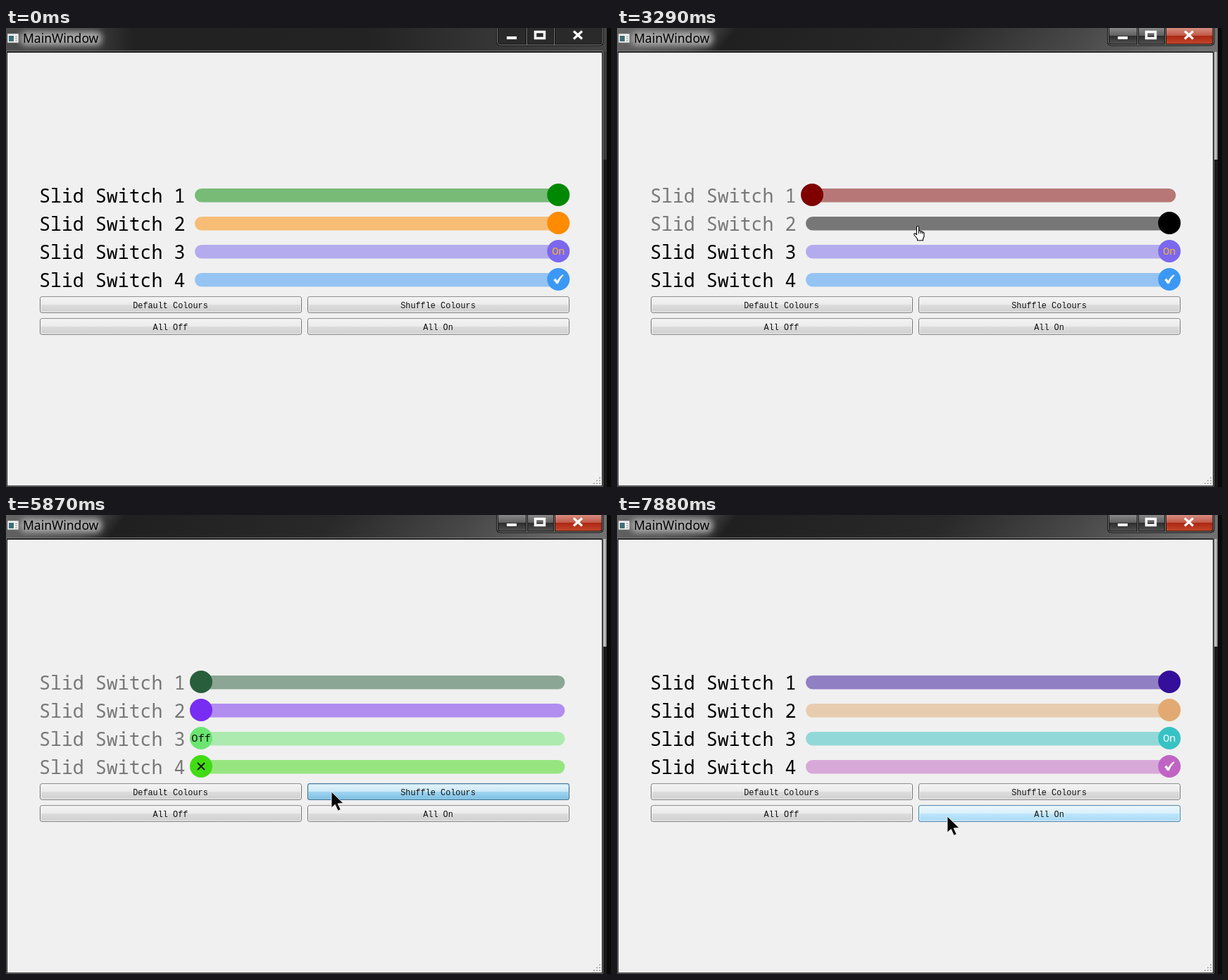
Write an HTML page that moves like this. It is 859 by 652 pixels and loops after 8000 ms.

```html
<!DOCTYPE html>
<html lang="en">
<head>
<meta charset="utf-8">
<title>Slide switches</title>
<style>
html, body { margin: 0; width: 100%; height: 100%; overflow: hidden; background: #000; }
svg { display: block; width: 859px; height: 652px; }
.label { font: 26.6px "Noto Sans Mono", monospace; }
.mark { font: 500 15.2px "Noto Sans Mono", monospace; text-anchor: middle; }
.btn { font: 11.85px "Liberation Mono", monospace; text-anchor: middle; fill: #111; }
.title { font: 17.5px "Noto Sans", sans-serif; }
</style>
</head>
<body>
<svg id="stage" viewBox="0 0 859 652" xmlns="http://www.w3.org/2000/svg">
  <defs>
    <linearGradient id="glass">
      <stop offset="0" stop-color="#4c4c4c"/><stop offset=".15" stop-color="#3a3a3a"/>
      <stop offset=".21" stop-color="#222"/><stop offset=".6" stop-color="#232323"/>
      <stop offset=".78" stop-color="#333"/><stop offset="1" stop-color="#444"/>
    </linearGradient>
    <linearGradient id="glassOn" x2="1" y2=".03">
      <stop offset="0" stop-color="#666"/><stop offset=".15" stop-color="#484848"/>
      <stop offset=".2" stop-color="#202020"/><stop offset=".55" stop-color="#292929"/>
      <stop offset=".78" stop-color="#484848"/><stop offset="1" stop-color="#707070"/>
    </linearGradient>
    <linearGradient id="red" x2="0" y2="1">
      <stop offset="0" stop-color="#d58d80"/><stop offset=".45" stop-color="#c25a48"/>
      <stop offset=".46" stop-color="#ac2612"/><stop offset="1" stop-color="#c64a2e"/>
    </linearGradient>
    <linearGradient id="grey" x2="0" y2="1">
      <stop offset="0" stop-color="#888"/><stop offset=".45" stop-color="#606060"/>
      <stop offset=".46" stop-color="#2c2c2c"/><stop offset="1" stop-color="#555"/>
    </linearGradient>
    <filter id="blur" x="-20%" y="-60%" width="140%" height="220%"><feGaussianBlur stdDeviation="4"/></filter>
  </defs>

  <rect width="859" height="652" fill="#0a0a0a"/>
  <rect width="853" height="652" fill="#191919"/>
  <rect width="853" height="187" fill="#3a3a3a"/>
  <rect width="853" height="34" fill="url(#glass)"/>
  <g id="active">
    <rect width="853" height="187" fill="#777"/>
    <rect x="848.5" y="34" width="3" height="153" fill="#c4c4c4"/>
    <rect width="853" height="34" fill="url(#glassOn)"/>
  </g>
  <rect x="20" y="5" width="116" height="20" rx="8" fill="#a8a8a8" filter="url(#blur)"/>
  <rect x="2" y="8" width="16" height="13" fill="#f4f4f4" stroke="#777" stroke-width=".8"/>
  <rect x="4" y="11" width="7" height="8" fill="#3d6f78"/>
  <path d="M13 12h3M13 15h3M13 18h3" stroke="#888"/>
  <text class="title" x="24" y="21">MainWindow</text>

  <g id="caption"></g>
  <rect x=".5" y="32.5" width="847" height="619" fill="none" stroke="#777" rx="1"/>
  <rect x="1" y="33.5" width="846" height="617.5" fill="#111"/>
  <rect x="2" y="35" width="844" height="615" fill="#f0f0f0"/>
  <path id="grip" fill="#b4b4b4"/>

  <g id="switches"></g>
  <g id="buttons"></g>
  <g id="cursor">
    <path id="arrow" d="M0 0V23L5.3 18.3L9.3 27.2L13.2 25.4L9.2 16.9L17 16.6Z" fill="#080808" stroke="#fff" stroke-width=".8"/>
    <g id="hand" stroke="#000" stroke-width="1.1" stroke-linejoin="round">
      <path fill="#fff" d="M.5 0Q.5-1.5 2-1.5Q3.5-1.5 3.5 0V5Q6 4.4 6.3 6Q8.5 5.4 8.8 7Q11 6.8 11 8.5V13L9.5 16.5V18.8H1.5V16.5L-3 11Q-3.6 8.8-1.8 8.8L.5 10.5Z"/>
      <path fill="none" d="M3.5 5V9M6.3 6V9M8.8 7V9.5"/>
    </g>
    <circle id="press" r="13" fill="#f0f01e" opacity=".58"/>
  </g>
</svg>
<script>
const $ = id => document.getElementById(id);
const NS = "http://www.w3.org/2000/svg";
const LOOP = 8000;

function add(parent, tag, attrs, text) {
  const el = document.createElementNS(NS, tag);
  for (const k in attrs) el.setAttribute(k, attrs[k]);
  if (text) el.textContent = text;
  parent.appendChild(el);
  return el;
}
const set = (el, attrs) => { for (const k in attrs) el.setAttribute(k, attrs[k]); };
const show = (el, on) => el.setAttribute("visibility", on ? "visible" : "hidden");
const within = (t, a, b) => t >= a && t < b;

// Linear interpolation over [time, value] pairs
function track(t, keys) {
  if (t <= keys[0][0]) return keys[0][1];
  for (let i = 1; i < keys.length; i++) {
    const [t0, v0] = keys[i - 1], [t1, v1] = keys[i];
    if (t < t1) return v0 + (v1 - v0) * (t - t0) / (t1 - t0);
  }
  return keys[keys.length - 1][1];
}

// Window caption buttons
const caption = $("caption");
const frame = "M697.5 -2V19Q697.5 24 702.5 24H842Q847 24 847 19V-2";
add(caption, "path", { d: frame, fill: "#2a2a2a" });
const lit = add(caption, "g", {});
add(lit, "path", { d: "M698 0V19Q698 24 703 24H778V0Z", fill: "url(#grey)" });
add(lit, "path", { d: "M778 0V24H842Q847 24 847 19V0Z", fill: "url(#red)" });
add(caption, "path", { d: frame + "M739.5 0V24M778.5 0V24", fill: "none", stroke: "#101010", "stroke-width": 3 });
add(caption, "path", { d: frame + "M739.5 0V24M778.5 0V24", fill: "none", stroke: "#858585" });
const glyph = { fill: "none", stroke: "#fff" };
add(caption, "rect", { x: 710.5, y: 11.5, width: 15, height: 5, fill: "#fff", stroke: "#333" });
add(caption, "rect", { x: 751.5, y: 5.5, width: 13, height: 9, ...glyph, "stroke-width": 3.5 });
add(caption, "path", { d: "M806 4.5L818 15.5M818 4.5L806 15.5", ...glyph, "stroke-width": 3.2 });

let dots = "";
for (let r = 0; r < 3; r++)
  for (let c = 0; c <= r; c++) dots += `M${842 - 4 * c} ${638 + 4 * r}h2v2h-2z`;
$("grip").setAttribute("d", dots);

// Switches
const COLORS = {
  on: ["#008800", "#ff8c00", "#7b68ee", "#3c98f5"],
  off: ["#800000", "#000", "#c8c8c8", "#c8c8c8"],
  shuffledOff: ["#285e3c", "#772df2", "#6be571", "#41dc14"],
  shuffledOn: ["#34109a", "#e2aa72", "#38c2c4", "#c064c4"]
};
const SHUFFLE = 5700, ALL_ON = 7650;
const OFF_AT = [2510, 3290, 4000, 4620];
const LEFT = 277, RIGHT = 784.3;

const switches = OFF_AT.map((_, i) => {
  const g = add($("switches"), "g", { transform: `translate(0 ${237 + 40 * i})` });
  const label = add(g, "text", { class: "label", x: 47, y: 10.5 }, `Slid Switch ${i + 1}`);
  const bar = add(g, "rect", { x: 268, y: -9, width: 525.5, height: 19.5, rx: 9.75, opacity: .5 });
  const knob = add(g, "g", {});
  const disc = add(knob, "circle", { r: 16 });
  let on, off;
  if (i === 2) {
    on = add(knob, "text", { class: "mark", y: 5 }, "On");
    off = add(knob, "text", { class: "mark", y: 5 }, "Off");
  } else if (i === 3) {
    on = add(knob, "path", { d: "M-7 1L-4 -1.5L-1.8 2Q1.5 -4 6.2 -6.8L7.4 -5.8Q2.5 -1 -.5 6.2H-3Q-4.5 3 -7 1Z" });
    off = add(knob, "path", { d: "M-5 -5L5 5M5 -5L-5 5", fill: "none", "stroke-width": 1.8 });
  }
  return { label, bar, knob, disc, on, off };
});

function drawSwitch(s, i, t) {
  const again = t >= ALL_ON, on = t < OFF_AT[i] || again;
  const shuffled = t >= SHUFFLE;
  const color = COLORS[on ? (again ? "shuffledOn" : "on") : (shuffled ? "shuffledOff" : "off")][i];
  const since = t < OFF_AT[i] ? 1e4 : t - (again ? ALL_ON : OFF_AT[i]);
  const p = Math.min(1, Math.floor(since / 70) * 75 / 120);
  const x = on ? LEFT + (RIGHT - LEFT) * p : RIGHT + (LEFT - RIGHT) * p;
  set(s.label, { fill: on ? "#000" : "#787878" });
  set(s.bar, { fill: color });
  set(s.disc, { fill: color });
  set(s.knob, { transform: `translate(${x} 0)` });
  if (!s.on) return;
  const ink = on ? (i === 2 && !again ? "#ffb62a" : "#fff") : (shuffled ? "#111" : "#fff");
  show(s.on, on);
  show(s.off, !on);
  set(s.on, { fill: ink });
  set(s.off, i === 2 ? { fill: ink } : { stroke: ink });
}

// Push buttons: normal, hover and pressed skins stacked
const SKINS = [
  ["#f3f3f3", "#ebebeb", "#dddddd", "#cfcfcf", "#707070"],
  ["#eaf6fd", "#d9f0fc", "#bee6fd", "#a7d9f5", "#3c7fb1"],
  ["#e5f4fc", "#c4e5f6", "#98d1ef", "#68b3db", "#2c628b"]
];
SKINS.forEach((c, n) => {
  const grad = add(document.querySelector("defs"), "linearGradient", { id: "skin" + n, x2: 0, y2: 1 });
  [0, .5, .5, 1].forEach((o, k) => add(grad, "stop", { offset: o, "stop-color": c[k] }));
});

function makeButton(x, y, text) {
  const g = add($("buttons"), "g", { transform: `translate(${x} ${y})` });
  const skins = SKINS.map((c, n) => {
    const skin = add(g, "g", { opacity: n ? 0 : 1 });
    add(skin, "rect", { x: .5, y: .5, width: 371, height: 22.5, rx: 2.5, fill: `url(#skin${n})`, stroke: c[4] });
    add(skin, "rect", { x: 1.5, y: 1.5, width: 369, height: 20.5, rx: 1.5, fill: "none", stroke: n > 1 ? "#9cc" : "#fff", opacity: n > 1 ? .5 : .75 });
    return skin;
  });
  add(g, "text", { class: "btn", x: 185.5, y: 16.8 }, text);
  return (hover, press) => {
    set(skins[1], { opacity: hover });
    set(skins[2], { opacity: press });
  };
}
makeButton(48, 381.3, "Default Colours");
const shuffleBtn = makeButton(428, 381.3, "Shuffle Colours");
makeButton(48, 412.3, "All Off");
const allOnBtn = makeButton(428, 412.3, "All On");

const SHUFFLE_HOVER = [[1150, 0], [1300, .55], [2210, 0], [5200, 0], [5400, 1], [6950, 1], [7650, 0]];
const SHUFFLE_PRESS = [[5619, 0], [5620, 1], [5780, 1], [6100, 0]];
const ALL_HOVER = [[1050, 0], [1200, .55], [2050, 0], [7000, 0], [7250, 1]];
const ALL_PRESS = [[7569, 0], [7570, 1], [7650, 1], [7880, 0]];

// Pointer moves: start, end, steps, x, y
const MOVES = [
  [590, 670, 2, 709, 625],
  [820, 1600, 11, 427, 228],
  [1680, 2210, 8, 428, 236],
  [2830, 3060, 4, 425, 283],
  [3520, 3680, 3, 424, 314],
  [4230, 4320, 2, 421, 352],
  [5070, 5400, 5, 462, 393],
  [6780, 7490, 10, 469, 428]
];
const PRESSES = [[2430, 2510], [3210, 3290], [3930, 4000], [4540, 4620], [5620, 5700], [7570, 7650]];

function pointer(t) {
  let x = 715, y = 629;
  for (const [a, b, n, tx, ty] of MOVES) {
    if (t < a) break;
    const p = Math.min(1, (Math.floor((t - a) / (b - a) * (n - 1) + 1e-6) + 1) / n);
    const e = p * p * (3 - 2 * p);
    x += (tx - x) * e;
    y += (ty - y) * e;
  }
  return [x, y];
}

function render(t) {
  const active = t >= 2430;
  show($("active"), active);
  show(lit, active);
  switches.forEach((s, i) => drawSwitch(s, i, t));
  shuffleBtn(track(t, SHUFFLE_HOVER), track(t, SHUFFLE_PRESS));
  allOnBtn(track(t, ALL_HOVER), track(t, ALL_PRESS));

  const [x, y] = pointer(t), seen = t >= 590;
  const overSwitch = x >= 261 && x <= 800 && y >= 221 && y < 373 && (y - 221) % 40 < 32;
  set($("cursor"), { transform: `translate(${x} ${y})` });
  show($("arrow"), seen && !overSwitch);
  show($("hand"), seen && overSwitch);
  show($("press"), PRESSES.some(([a, b]) => within(t, a, b)));
}

const start = performance.now();
function tick() {
  render((performance.now() - start) % LOOP);
  requestAnimationFrame(tick);
}
tick();
</script>
</body>
</html>
```
